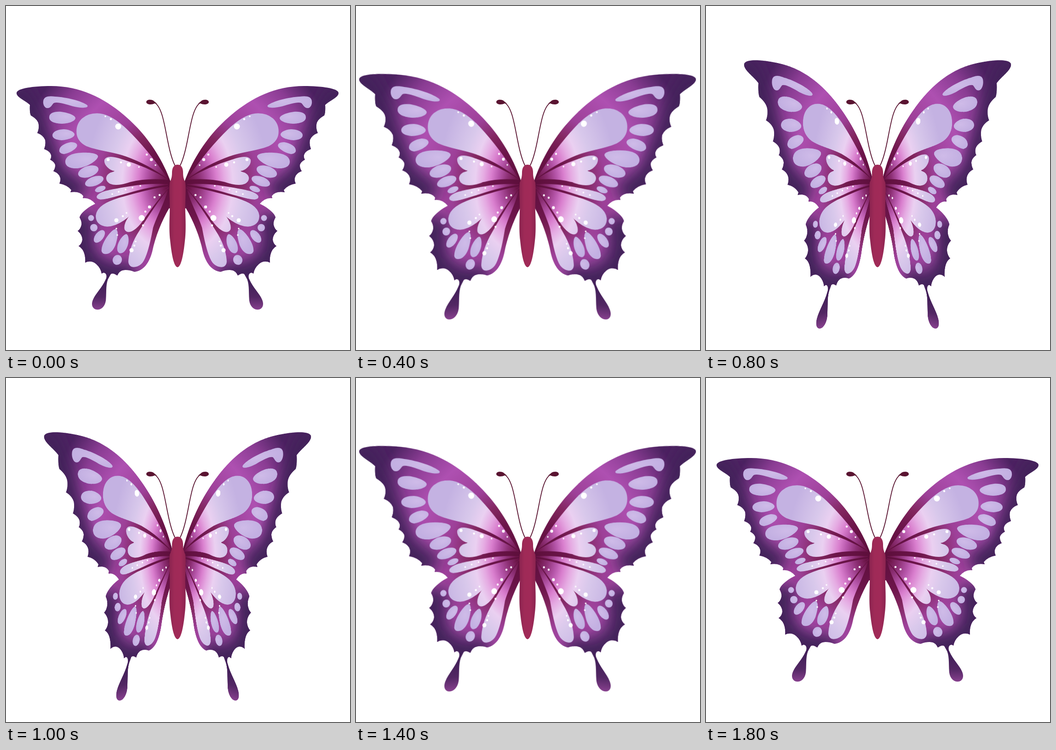
An HTML page without scripts for the animation above (2000 ms loop, 748 px wide and 748 px high).

```html
<!DOCTYPE html>
<html lang="en">
<head>
<meta charset="utf-8">
<title>Butterfly</title>
<style>
  html, body { margin: 0; width: 100%; height: 100%; overflow: hidden; background: #fff; }
  main { position: relative; width: 100%; height: 100%; overflow: hidden; contain: strict; }
  .side, svg { position: absolute; left: 0; top: 0; width: 748px; height: 748px; }
  .side { perspective: 1095px; perspective-origin: 373px 374px; transform-origin: 373px 374px; }
  .right { transform: scaleX(-1); }
  /* Only the half plane that holds the wing is kept, so nothing spills past the stage. */
  .wing { width: 374px; overflow: hidden; transform-origin: 373px 374px; animation: flap 2s infinite; }
  /* Both wings swing about the body axis, one step every 100 ms, then rest. */
  @keyframes flap {
    0% { transform: rotateY(0deg); animation-timing-function: steps(9, end); }
    45% { transform: rotateY(58deg); animation-timing-function: steps(9, end); }
    90%, 100% { transform: rotateY(0deg); }
  }
</style>
</head>
<body>
<main>
<div class="side">
  <svg class="wing" viewBox="0 0 374 748">
    <defs>
      <radialGradient id="membrane" gradientUnits="userSpaceOnUse" cx="357" cy="385" r="370">
        <stop offset="0" stop-color="#5c0e3a"/>
        <stop offset=".2" stop-color="#6c154a"/>
        <stop offset=".31" stop-color="#82265f"/>
        <stop offset=".43" stop-color="#9d4098"/>
        <stop offset=".62" stop-color="#ae50b1"/>
        <stop offset=".78" stop-color="#8a3c93"/>
        <stop offset=".92" stop-color="#4c2261"/>
      </radialGradient>
      <radialGradient id="cell" gradientUnits="userSpaceOnUse" r="185" gradientTransform="translate(360 385) scale(1 1.4)" cx="0" cy="0">
        <stop offset=".08" stop-color="#6d1549"/>
        <stop offset=".19" stop-color="#8c2f74"/>
        <stop offset=".3" stop-color="#b656aa"/>
        <stop offset=".39" stop-color="#d97fce"/>
        <stop offset=".48" stop-color="#e5aae2"/>
        <stop offset=".58" stop-color="#ead0f1"/>
        <stop offset=".72" stop-color="#d8c8eb"/>
        <stop offset="1" stop-color="#c4b2e2"/>
      </radialGradient>
      <radialGradient id="spot" cx=".65" cy=".4" r=".6">
        <stop offset="0" stop-color="#cfbbe8"/>
        <stop offset="1" stop-color="#c3b0e2"/>
      </radialGradient>
      <linearGradient id="tail" x2="0" y2="1">
        <stop offset=".3" stop-color="#44205a"/>
        <stop offset=".65" stop-color="#522763"/>
        <stop offset="1" stop-color="#87408e"/>
      </linearGradient>
      <filter id="soft" filterUnits="userSpaceOnUse" x="-80" y="80" width="500" height="600">
        <feGaussianBlur stdDeviation="15"/>
      </filter>
      <clipPath id="outline">
        <path d="M358 382C342 338 316 297 285 264C236 213 175 174 98 174C60 174 22 179 23 190C24 199 43 206 52 215Q51 231 54 238Q70 247 71 258Q72 268 68 276Q81 281 85 291Q87 301 83 311Q96 316 98 324Q99 330 96 334Q107 340 107 347Q107 353 103 359Q116 364 118 374Q119 380 116 386Q133 389 142 400L140 405Q160 402 168 413L167 418Q182 416 194 430L358 440Z"/>
        <path d="M358 384L194 430C179 437 162 450 160 460Q165 468 164 476Q162 485 156 489Q166 498 166 508Q165 517 158 522Q168 528 171 541Q173 550 172 558Q185 552 196 561Q206 570 208 582Q214 577 219 585L226 585Q230 578 242 586Q247 574 260 574Q270 574 279 578C300 576 312 557 318 534C325 500 340 464 357 436Z"/>
      </clipPath>
    </defs>

    <g id="wing">
      <path fill="url(#tail)" d="M216 581Q221 588 216 596C208 615 187 632 187 648C187 665 213 666 217 641C219 622 216 602 224 590L229 581Z"/>
      <g clip-path="url(#outline)">
        <path fill="url(#membrane)" d="M0 150H374V620H0Z"/>
        <g fill="none" stroke="#42205a" filter="url(#soft)">
          <path stroke-width="66" d="M15 185L50 250L75 310L100 370L160 418"/>
          <path stroke-width="76" d="M158 450L152 500L162 555L210 590L280 598"/>
        </g>
      </g>

      <g fill="url(#cell)" stroke="url(#cell)" stroke-width="1.5">
        <path d="M154 273C154 250 172 234 198 234C219 234 241 248 262 268C289 294 319 329 350 374C326 356 296 339 260 326C230 316 199 314 175 304C161 297 154 287 154 273Z"/>
        <path d="M215 334C219 326 235 328 252 334C286 344 321 359 351 377C320 374 290 377 270 382C250 389 236 390 227 386C217 381 216 371 224 365C229 361 238 362 236 358C226 357 212 345 215 334Z"/>
        <path d="M198 414C203 403 232 399 268 393C298 388 330 387 352 388C322 391 292 398 262 407C236 414 215 421 205 420Q197 419 198 414Z"/>
        <path d="M196 455C199 436 218 427 245 418C285 407 320 397 352 393C327 406 295 430 272 453C252 471 236 479 220 479C203 478 195 468 196 455Z"/>
        <path d="M258 482C258 466 275 447 295 431C315 415 335 403 354 395C335 414 314 442 296 468C284 485 270 493 263 490Q258 488 258 482Z"/>
        <path d="M267 552C269 530 279 507 290 490C306 464 330 427 351 401C343 431 327 456 319 482C313 515 306 545 296 558C287 568 275 569 270 564Q266 560 267 552Z"/>
      </g>

      <g fill="url(#spot)">
        <path d="M81 207C82 196 94 195 107 197C130 198 167 207 177 216C181 223 160 222 145 218C128 213 112 208 104 211C100 214 98 222 90 222C84 222 80 214 81 207Z"/>
        <path d="M94 242C94 233 104 229 120 230C136 232 151 238 151 244C150 251 135 256 120 256C104 255 94 251 94 242Z"/>
        <path d="M101 281C102 272 114 268 127 268C140 269 150 275 149 280C148 286 135 291 121 292C109 291 101 288 101 281Z"/>
        <path d="M116 313C117 304 129 298 141 296C151 296 157 300 154 306C150 313 137 320 126 322C119 321 115 318 116 313Z"/>
        <path d="M129 337C131 325 145 320 164 319C184 318 201 321 200 328C197 337 177 350 156 353C140 354 128 349 129 337Z"/>
        <ellipse cx="179" cy="360" rx="23" ry="12" transform="rotate(-18 179 360)"/>
        <ellipse cx="192" cy="381" rx="21" ry="10" transform="rotate(-20 192 381)"/>
        <ellipse cx="205" cy="398" rx="12" ry="6" transform="rotate(-20 205 398)"/>
        <circle cx="185" cy="461" r="6.5"/>
        <circle cx="191" cy="482" r="8"/>
        <ellipse cx="203" cy="501" rx="9" ry="16" transform="rotate(38 203 501)"/>
        <path d="M208 528C210 512 228 487 238 485C246 487 243 505 238 520C232 535 222 541 214 539Q206 537 208 528Z"/>
        <path d="M242 525C243 512 255 496 262 496C268 499 268 515 263 525C258 537 250 539 246 537Q241 534 242 525Z"/>
        <ellipse cx="242" cy="552" rx="10" ry="11" transform="rotate(25 242 552)"/>
      </g>

      <g fill="none" stroke="#fff" stroke-linecap="round">
        <path stroke-width="13" d="M244 262h.01M295 461h.01"/>
        <path stroke-width="9" d="M267 345h.01M240 466h.01M273 531h.01"/>
        <path stroke-width="6.5" d="M222 334h.01M316 334h.01M312 437h.01"/>
        <path stroke-width="4.5" d="M228 246h.01M306 323h.01M250 340h.01M303 447h.01M323 416h.01M334 411h.01M254 457h.01M279 521h.01M298 477h.01"/>
        <path stroke-width="3.5" d="M216 240h.01M325 346h.01M289 350h.01M262 450h.01M282 512h.01M240 484h.01M242 498h.01M231 409h.01M245 404h.01M260 399h.01M275 395h.01M292 391h.01"/>
      </g>
    </g>
  </svg>
</div>

<div class="side right">
  <svg class="wing" viewBox="0 0 374 748"><use href="#wing"/></svg>
</div>

<svg viewBox="0 0 748 748">
  <defs>
    <linearGradient id="body">
      <stop offset="0" stop-color="#8b2450"/>
      <stop offset=".3" stop-color="#9f2a57"/>
      <stop offset=".7" stop-color="#a12a58"/>
      <stop offset="1" stop-color="#8b2450"/>
    </linearGradient>
    <g id="antenna" fill="#5a1431">
      <path d="M305 209C305 203 317 202 322 207L328 212L323 212C317 215 306 215 305 209Z"/>
      <path fill="none" stroke="#5a1431" stroke-width="1.8" d="M323 210C340 220 345 262 352 295C357 320 361 335 368 348"/>
    </g>
  </defs>
  <use href="#antenna"/>
  <use href="#antenna" transform="matrix(-1 0 0 1 746 0)"/>
  <path fill="url(#body)" d="M373 345C381 345 385 352 385 362C385 373 387 377 390 384C392 405 389 425 390 450C391 475 391 495 389 510C386 540 381 567 373 568C365 567 360 540 357 510C355 495 355 475 356 450C357 425 354 405 356 384C359 377 361 373 361 362C361 352 365 345 373 345Z"/>
</svg>
</main>
</body>
</html>
```
